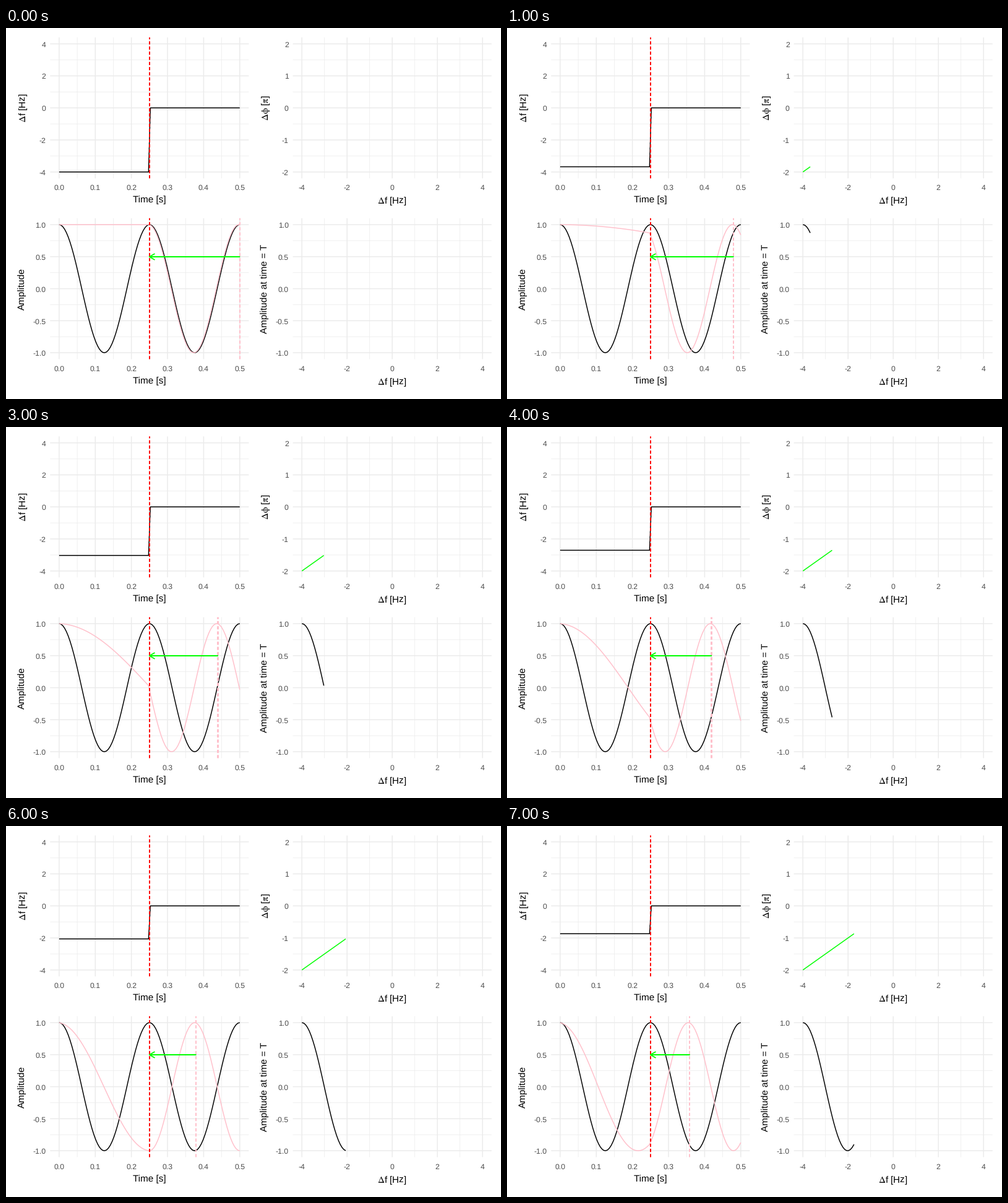
These frames come from a looping animation (800x600 px, 8 s). A matplotlib script:

```python
import numpy as np
import matplotlib as mpl
import matplotlib.pyplot as plt
from matplotlib.animation import FuncAnimation

mpl.rcParams.update({
    "font.family": "Liberation Sans",
    "mathtext.fontset": "stix",
    "text.hinting": "none",
    "lines.scale_dashes": False,
    "path.snap": False,
})

W, H, DPI = 800, 600, 100
PX = 72 / DPI
THIN, NORMAL, BOLD = 0.74, 1.48, 2.0
SWITCH = 0.25          # time of the frequency step
CARRIER = 4.0          # Hz
N = 100
STRIDE = 4             # sweep samples per animation step

t = np.linspace(0, 0.5, N)
dt = t[1] - t[0]
sweep = np.linspace(-4, 4, N)

fig = plt.figure(figsize=(W / DPI, H / DPI), dpi=DPI, facecolor="white")
ax = fig.add_axes([0, 0, 1, 1])
ax.set_xlim(0, W)
ax.set_ylim(H, 0)
ax.axis("off")


def stroke(x, y, color, width=NORMAL, z=3, **kw):
    line, = ax.plot(x, y, color=color, lw=width * PX, zorder=z,
                    solid_capstyle="butt", dash_capstyle="butt",
                    solid_joinstyle="round", **kw)
    line.set_snap(False)
    return line


class Panel:
    """Plot area with a light grid, tick labels and axis titles."""

    def __init__(self, left, top, xlim, ylim):
        self.left, self.top = left, top
        self.right, self.bottom = left + 321.06, top + 227.9
        self.xlim, self.ylim = xlim, ylim

    def x(self, v):
        lo, hi = self.xlim
        pad = (self.right - self.left) / 22
        return self.left + pad + (np.asarray(v) - lo) / (hi - lo) * 20 * pad

    def y(self, v):
        lo, hi = self.ylim
        pad = (self.bottom - self.top) / 22
        return self.bottom - pad - (np.asarray(v) - lo) / (hi - lo) * 20 * pad

    def grid(self, xticks, yticks, xfmt, yfmt):
        def mid(v):
            return (v[1:] + v[:-1]) / 2

        for ticks, width, z in ((mid(xticks), THIN, 1), (xticks, NORMAL, 2)):
            for v in ticks:
                stroke([self.x(v)] * 2, [self.bottom, self.top], "#EBEBEB", width, z)
        for ticks, width, z in ((mid(yticks), THIN, 1), (yticks, NORMAL, 2)):
            for v in ticks:
                stroke([self.left, self.right], [self.y(v)] * 2, "#EBEBEB", width, z)

        style = dict(fontsize=8.8, color="#4D4D4D", va="baseline")
        for v in xticks:
            ax.text(self.x(v), self.bottom + 19, xfmt.format(v), ha="center", **style)
        for v in yticks:
            ax.text(self.left - 6.9, self.y(v) + 5, yfmt.format(v), ha="right", **style)

    def titles(self, xlabel, ylabel, xdrop, ydrop):
        style = dict(fontsize=11, color="black", ha="center", va="baseline")
        ax.text((self.left + self.right) / 2, self.bottom + xdrop, xlabel, **style)
        ax.text(self.left - ydrop, (self.top + self.bottom) / 2, ylabel,
                rotation=90, rotation_mode="anchor", **style)

    def line(self, x, y, color, z=3):
        return stroke(self.x(x), self.y(y), color, z=z)

    def marker(self, v, color, z):
        line = stroke([], [], color, BOLD, z, linestyle=(0, (5.1 * PX, 3.23 * PX)))
        self.move_marker(line, v)
        return line

    def move_marker(self, line, v):
        # Repeated strokes fill every touched pixel column.
        x = float(self.x(v))
        a, b = np.floor(x - NORMAL / 2), np.ceil(x + NORMAL / 2)
        line.set_data([(a + b) / 2] * 2, [self.bottom, self.top])
        line.set_linewidth((b - a) * PX)


LEFT, RIGHT, TOP, LOW = 71.3, 463.66, 15.28, 307.64
freq = Panel(LEFT, TOP, (0, 0.5), (-4, 4))
phase = Panel(RIGHT, TOP, (-4, 4), (-2, 2))
wave = Panel(LEFT, LOW, (0, 0.5), (-1, 1))
final = Panel(RIGHT, LOW, (-4, 4), (-1, 1))

times = np.arange(6) / 10
hertz = np.arange(-4, 5, 2)
halves = np.arange(-2, 3) / 2
freq.grid(times, hertz, "{:.1f}", "{:d}")
phase.grid(hertz, np.arange(-2, 3), "{:d}", "{:d}")
wave.grid(times, halves, "{:.1f}", "{:.1f}")
final.grid(hertz, halves, "{:d}", "{:.1f}")

DELTA_F = r"$\mathrm{\Delta}$f [Hz]"
DELTA_PHI = r"$\mathrm{\Delta\phi}$ [$\mathrm{\pi}$]"
freq.titles("Time [s]", DELTA_F, 39, 39.3)
phase.titles(DELTA_F, DELTA_PHI, 41, 39.3)
wave.titles("Time [s]", "Amplitude", 39, 41.5)
final.titles(DELTA_F, "Amplitude at time = T", 41, 41.5)

# Fixed curves and the switch marker
wave.line(t, np.cos(2 * np.pi * CARRIER * t), "black")
freq.marker(SWITCH, "red", 6)
wave.marker(SWITCH, "red", 6)

# Moving parts
step = freq.line([], [], "black")
shifted = wave.line([], [], "pink", 4)
peak = wave.marker(0.5, "pink", 7)
ramp = phase.line([], [], "#00FF00")
trace = final.line([], [], "black")

arrow_y = 370
tip = float(wave.x(SWITCH))
shaft = stroke([], [], "#00FF00", BOLD, 8)
stroke([tip + 8.66, tip, tip + 8.66], [arrow_y - 5, arrow_y, arrow_y + 5],
       "#00FF00", 1.8, 8)


def draw(i):
    last = i * STRIDE
    df = sweep[last]

    offset = np.where(t < SWITCH, df, 0)
    step.set_data(freq.x(t), freq.y(offset))

    angle = 2 * np.pi * dt * np.cumsum(CARRIER + offset)
    shifted.set_data(wave.x(t), wave.y(np.cos(angle)))

    crest = SWITCH - df / 16
    wave.move_marker(peak, crest)
    shaft.set_data([tip, float(wave.x(crest)) + 0.5], [arrow_y, arrow_y])

    past = sweep[:last + 1]
    ramp.set_data(phase.x(past), phase.y(past / 2))
    at_switch = np.cos(2 * np.pi * dt * (N // 2) * (CARRIER + past))
    trace.set_data(final.x(past), final.y(at_switch))
    return step, shifted, peak, shaft, ramp, trace


anim = FuncAnimation(fig, draw, frames=8, interval=1000, repeat=True,
                     repeat_delay=0, blit=False)
plt.show()
```
